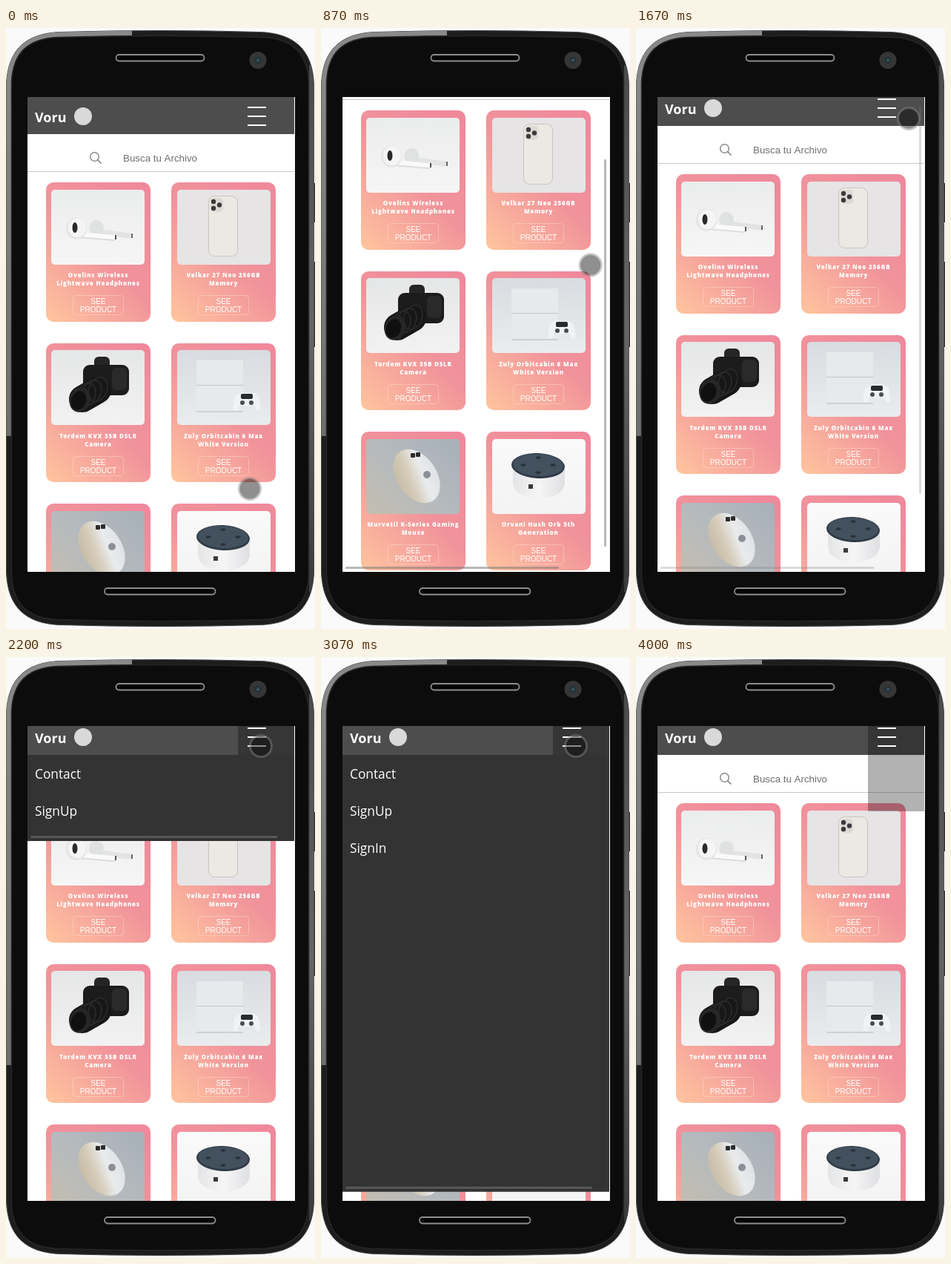
An HTML page with a canvas for the animation above (4940 ms loop, 417 px wide and 810 px high).

```html
<!DOCTYPE html>
<html lang="es">
<head>
<meta charset="utf-8">
<title>Store</title>
<style>
html, body { margin: 0; width: 100%; height: 100%; overflow: hidden; background: #fafafa; }
canvas { display: block; }
</style>
</head>
<body>
<canvas id="stage" width="417" height="810"></canvas>
<script>
const ctx = document.getElementById('stage').getContext('2d');
const LOOP = 4940, TICK = 1000 / 15;
const UI = '"Open Sans", "Noto Sans", sans-serif';
const ARIAL = '"Liberation Sans", Arial, sans-serif';
const BAR = 'rgba(120,120,120,.52)';

// Smooth rise from 0 to 1 between ticks a and b
function ramp(n, a, b) {
  const p = Math.min(1, Math.max(0, (n - a) / (b - a)));
  return p * p * (3 - 2 * p);
}

function rect(x, y, w, h, fill) {
  ctx.fillStyle = fill;
  ctx.fillRect(x, y, w, h);
}

function paint(fill, stroke, width = 1) {
  if (fill) { ctx.fillStyle = fill; ctx.fill(); }
  if (stroke) { ctx.strokeStyle = stroke; ctx.lineWidth = width; ctx.stroke(); }
}

function round(x, y, w, h, r, fill, stroke, width) {
  ctx.beginPath();
  ctx.roundRect(x, y, w, h, r);
  paint(fill, stroke, width);
}

function oval(x, y, rx, ry, fill, turn = 0, stroke, width) {
  ctx.beginPath();
  ctx.ellipse(x, y, rx, ry, turn, 0, 2 * Math.PI);
  paint(fill, stroke, width);
}

function dot(x, y, r, fill) {
  oval(x, y, r, r, fill);
}

function line(x1, y1, x2, y2, color, width, cap = 'butt') {
  ctx.beginPath();
  ctx.moveTo(x1, y1);
  ctx.lineTo(x2, y2);
  ctx.lineCap = cap;
  paint(null, color, width);
}

function grad(x1, y1, x2, y2, ...stops) {
  const g = ctx.createLinearGradient(x1, y1, x2, y2);
  stops.forEach((c, i) => g.addColorStop(i / (stops.length - 1), c));
  return g;
}

function text(str, x, y, font, color, align = 'left', gap = 0) {
  ctx.font = font;
  ctx.fillStyle = color;
  ctx.textAlign = align;
  ctx.letterSpacing = gap + 'px';
  ctx.fillText(str, x, y);
}

function inside(x, y, w, h, r, content) {
  ctx.save();
  ctx.beginPath();
  ctx.roundRect(x, y, w, h, r);
  ctx.clip();
  content();
  ctx.restore();
}

// Product pictures, each 126 x 101
function backdrop(top, bottom) {
  rect(0, 0, 126, 101, grad(0, 0, 0, 101, top, bottom));
}

function earbuds() {
  backdrop('#ebecec', '#f6f6f6');
  line(66, 57, 107, 62, '#e2e3e3', 7, 'round');
  dot(61, 51, 10, '#e0e1e1');
  line(38, 61, 84, 65, '#dcdddd', 8, 'round');
  line(38, 60, 84, 64, '#fafafa', 6, 'round');
  oval(34, 52, 14, 15, '#e4e5e5');
  oval(35, 51, 12, 13, '#f5f5f5');
  oval(32, 51, 3.5, 7, '#2a2a2a');
  line(87, 61, 87, 67, '#555', 2);
  line(109, 59, 109, 65, '#666', 2);
}

function phone() {
  backdrop('#e6e4e5', '#e6e4e5');
  round(42.5, 8.5, 39, 81, 8, '#ebe9e3', '#c8c5bd');
  round(45, 11, 17, 19, 5, '#dcd9d2');
  for (let k = 0; k < 3; k++) dot(49 + 8 * (k % 2), 16 + 4.5 * k, 3.2, '#3a3a3e');
}

function camera() {
  backdrop('#e5e6e7', '#f2f2f2');
  round(58, 9, 21, 24, 6, '#252526');
  round(43, 20, 62, 41, 9, '#1c1c1d');
  round(82, 24, 20, 30, 6, '#2a2a2b');
  line(42, 66, 63, 54, '#171718', 36, 'round');
  for (let k = 0; k < 3; k++) oval(63 - 8 * k, 53 + 4 * k, 12, 17, null, .4, '#2c2c2d', 1.5);
  oval(39, 67, 14, 17, '#262627', .35);
  oval(37, 68, 10, 13, '#101011', .35);
}

function gamebox() {
  backdrop('#d8dce0', '#eaecee');
  rect(26, 14, 63, 69, '#e7eaed');
  rect(26, 47, 63, 1, '#c0c5ca');
  rect(26, 82, 63, 2, '#cdd1d5');
  for (const side of [-1, 1]) line(94 + side * 13, 65, 94 + side * 15, 78, '#f1f2f3', 7, 'round');
  round(79, 58, 30, 17, 7, '#f1f2f3');
  round(86, 59, 16, 7, 2, '#2a2b2d');
  for (const side of [-1, 1]) dot(94 + side * 6, 71, 3, '#4a4c4f');
}

function mouse() {
  rect(0, 0, 126, 101, grad(110, 0, 10, 101, '#a9b1b9', '#b5babe', '#c3bdb1'));
  oval(68, 50, 27, 40, grad(42, 62, 94, 42, '#c6bca6', '#d5ccb9', '#e9ebed', '#dfe3e7'), -.6);
  for (let k = 0; k < 2; k++) round(60 + 7 * k, 19 - k, 6, 6, 1, '#2b2b2d');
  dot(82, 48, 5, '#8b9098');
}

function speaker() {
  backdrop('#fafafa', '#f3f3f3');
  oval(63, 62, 34, 18, grad(29, 0, 97, 0, '#e4e5e6', '#f6f6f7', '#dfe0e2'));
  rect(28, 38, 70, 24, grad(29, 0, 97, 0, '#e4e5e6', '#f6f6f7', '#dfe0e2'));
  oval(62, 36, 36, 17, '#2f3a45', .05);
  oval(62, 35, 34, 15, '#43505d', .05);
  for (let k = 0; k < 4; k++) {
    const a = k * Math.PI / 2;
    oval(62 + 20 * Math.cos(a), 35 + 10 * Math.sin(a), 3.5, 1.8, '#28323c');
  }
  rect(49, 61, 6, 6, '#3a3a3c');
}

const products = [
  [earbuds, 'Ovelins Wireless', 'Lightwave Headphones'],
  [phone, 'Velkar 27 Neo 256GB', 'Memory'],
  [camera, 'Tordem KVX 35B DSLR', 'Camera'],
  [gamebox, 'Zuly Orbitcabin 6 Max', 'White Version'],
  [mouse, 'Murvetil K-Series Gaming', 'Mouse'],
  [speaker, 'Orvani Hush Orb 5th', 'Generation']
];

function card([picture, ...title], i) {
  const col = i % 2, x = 54 + 169 * col;
  const rowY = 208.1 + 216.45 * (i >> 1), y = Math.round(rowY);
  const h = Math.round(rowY + 187.45) - y;
  const cx = x + 70.5, cy = y + h / 2;
  round(x, y, 141, h, 10, grad(cx - 82, cy + 82, cx + 82, cy - 82, '#ffc59e', '#f1939b', '#ef889b'));

  ctx.save();
  ctx.translate(x + 7 + col, Math.round(rowY + 9.7));
  inside(0, 0, 126, 101, 5, picture);
  ctx.restore();

  round(x + 36.5, y + 152.5, 68, 26, 4, null, 'rgba(255,225,215,.42)');
  title.forEach((s, k) => text(s, cx, y + 128 + 11 * k, '800 8px ' + UI, '#fff', 'center', .8));
  ['SEE', 'PRODUCT'].forEach((s, k) => text(s, cx, y + 164 + 11 * k, '10px ' + ARIAL, '#fff', 'center'));
}

function page(highlight) {
  line(29, 193.5, 389, 193.5, '#c8c8c8', 1);
  oval(119.5, 173.5, 5.8, 5.8, null, 0, '#777', 1.3);
  line(123.7, 177.7, 128.5, 182.5, '#777', 1.4);
  text('Busca tu Archivo', 158, 180, '13.33px ' + ARIAL, '#6f6f6f');
  products.forEach(card);

  rect(29, 93, 360, 50, '#4d4d4d');
  text('Voru', 39, 127, 'bold 18px ' + UI, '#fff');
  dot(104, 119, 12, '#d9d9d9');
  if (highlight) rect(313, 93, 76, 126, 'rgba(0,0,0,.3)');
  for (let k = 0; k < 3; k++) rect(326, 106 + 12 * k, 25, 2, '#fff');
}

function menu(open) {
  const bottom = 82 + 640 * open;
  if (bottom <= 132) return;
  inside(29, 132, 360, bottom - 132, 0, () => {
    rect(29, 132, 360, 600, '#333');
    ['Contact', 'SignUp', 'SignIn'].forEach((s, i) => text(s, 39, 164 + 50 * i, '17.3px ' + UI, '#fff'));
    round(33, bottom - 7, 333, 3, 1.5, '#585858');
  });
}

// Rounded slab with slightly bulging ends, mirrored about the middle
function slab(inset, corner) {
  const w = 208 - inset, h = 402 - inset, c = corner;
  ctx.beginPath();
  for (const [sx, sy] of [[-1, -1], [1, -1], [1, 1], [-1, 1]]) {
    const px = v => 208 + sx * v, py = v => 405 + sy * v;
    const side = [px(w), py(h - c)], end = [px(w - c), py(h - 2)];
    const nearSide = [px(w - 2), py(h - c * .36)], nearEnd = [px(w - c * .36), py(h - 4)];
    if (sx === sy) {
      ctx.lineTo(...side);
      ctx.bezierCurveTo(...nearSide, ...nearEnd, ...end);
      ctx.quadraticCurveTo(208, py(h + 2), px(c - w), py(h - 2));
    } else {
      ctx.lineTo(...end);
      ctx.bezierCurveTo(...nearEnd, ...nearSide, ...side);
    }
  }
  ctx.closePath();
}

function pill(x, y, w) {
  round(x, y, w, 8.5, 4.2, '#050505', '#8d8d8d', 1.8);
}

function device() {
  rect(0, 0, 417, 810, '#fafafa');
  rect(414, 209, 3, 53, '#2b2b2b');
  rect(414, 315, 3, 115, '#2b2b2b');
  slab(.5, 72);
  paint('#1d1d1d', '#454545');
  ctx.save();
  ctx.clip();
  rect(0, 0, 170, 550, grad(0, 0, 0, 550, '#8a8a8a', '#6e6e6e'));
  rect(409, 50, 7, 710, grad(0, 50, 0, 760, '#4a4a4a', '#666', '#3a3a3a'));
  ctx.restore();
  slab(7.5, 62);
  paint('#0c0c0c', '#262626', 1.5);
  pill(148.5, 36, 119);
  pill(133, 755, 149.5);
  dot(340, 43.5, 11.5, '#363636');
  dot(340, 43.5, 5, '#26343a');
  dot(340, 43.5, 1.6, '#3f6670');
}

function touch(x, y, alpha) {
  ctx.globalAlpha = alpha;
  dot(x, y, 13.5, 'rgba(0,0,0,.44)');
  oval(x, y, 14.5, 14.5, null, 0, 'rgba(128,128,128,.45)', 3);
  ctx.globalAlpha = 1;
}

function draw(time) {
  const n = Math.floor((time + 3.4) / TICK);
  const swipe = ramp(n, 0, 5), nudge = ramp(n, 6, 8), back = ramp(n, 12, 16);
  const settle = ramp(n, 17, 20), reach = ramp(n, 22, 25), aim = ramp(n, 25, 30);
  const scroll = Math.round(125 * swipe - 10 * nudge - 115 * back + 11 * settle);
  const x = 329 + 34 * swipe + 5 * back + 23 * settle - 23 * reach - 24 * aim;
  const y = 621 - 348 * swipe + 11 * nudge + 227 * back - 14 * settle - 375 * reach - 2 * aim;
  const open = ramp(n, 31, 37) - ramp((n - 46) * TICK, -10, 390);

  device();
  inside(29, 93, 361, 640, 0, () => {
    rect(29, 93, 361, 640, '#fff');
    ctx.translate(0, -scroll);
    page(n >= 31);
    ctx.translate(0, scroll);
    ctx.globalAlpha = n ? 1 - ramp(n, 22, 28) : 0;
    round(382, 97 + scroll * .824, 3, 522, 1, BAR);
    round(33, 726, 288, 3, 1, BAR);
    ctx.globalAlpha = 1;
    menu(open);
  });
  touch(x, y, 1 - ramp(n, 58, 60));
}

const start = performance.now();
function loop() {
  draw((performance.now() - start) % LOOP);
  requestAnimationFrame(loop);
}
loop();
</script>
</body>
</html>
```
